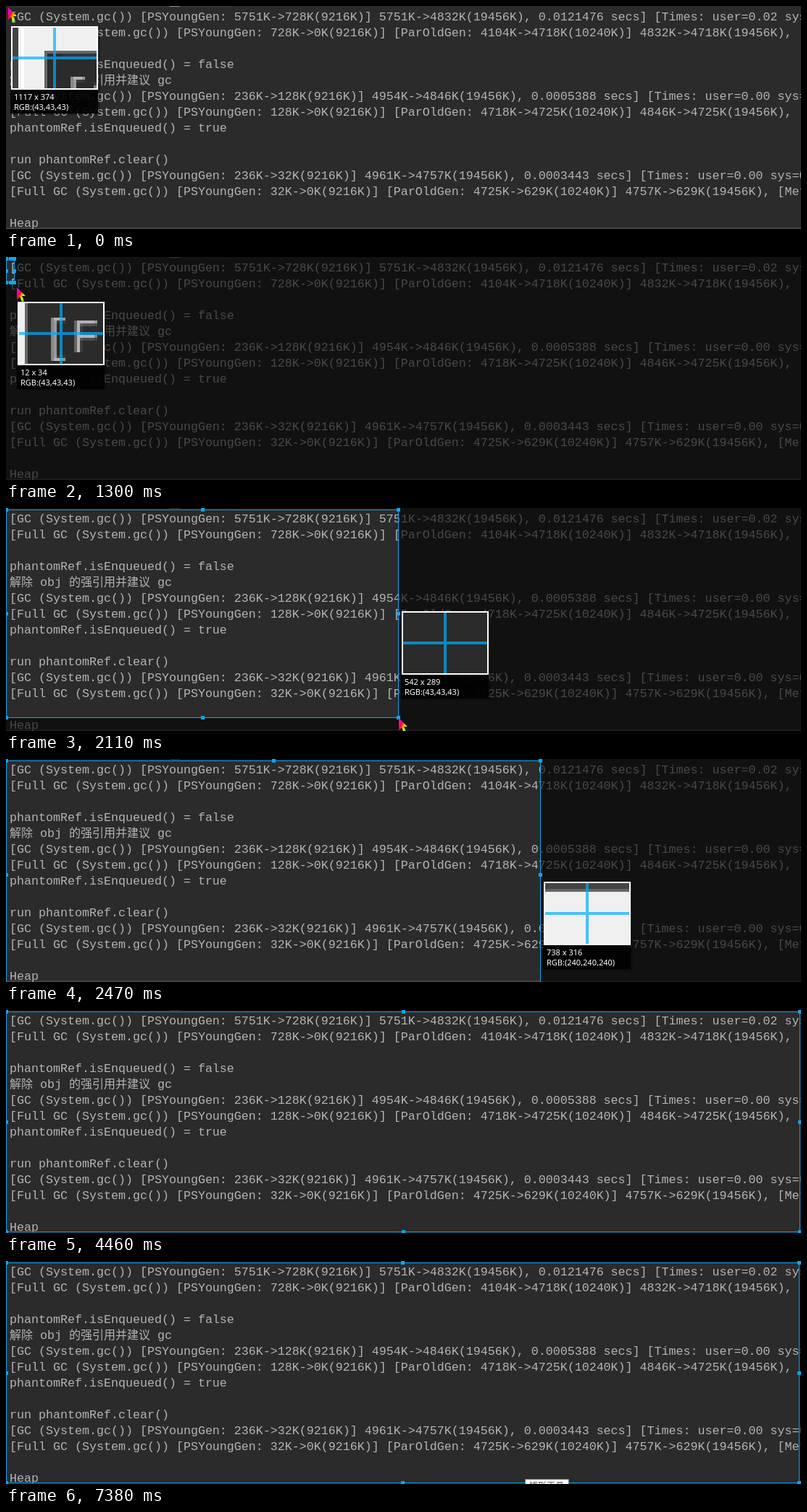
Write an HTML page with a canvas that moves like this. It is 1097x309 px and loops after 8 s.

```html
<!DOCTYPE html>
<html lang="zh">
<head>
<meta charset="utf-8">
<title>Screen region selection</title>
<style>
html, body { margin: 0; width: 100%; height: 100%; overflow: hidden; background: #2b2b2b; }
canvas { display: block; }
</style>
</head>
<body>
<canvas id="stage" width="1097" height="309"></canvas>
<script>
const W = 1097, H = 309, LOOP = 8000, PAD = 40, TOP = 2;
const BLUE = '#0ca5f5', CROSS = 'rgba(0, 174, 255, .7)';
const MONO = '16.667px "Liberation Mono", monospace';
const CJK = '"Noto Sans CJK SC", "Noto Sans CJK", sans-serif';

const minorGc = (young, youngLeft, total, left, secs, user) =>
  `[GC (System.gc()) [PSYoungGen: ${young}K->${youngLeft}K(9216K)] ` +
  `${total}K->${left}K(19456K), ${secs} secs] [Times: user=${user} sys=0.00`;
const fullGc = (young, old, left, total) =>
  `[Full GC (System.gc()) [PSYoungGen: ${young}K->0K(9216K)] ` +
  `[ParOldGen: ${old}K->${left}K(10240K)] ${total}K->${left}K(19456K), [Metaspace`;

const LINES = [
  minorGc(5751, 728, 5751, 4832, '0.0121476', '0.02'),
  fullGc(728, 4104, 4718, 4832),
  '',
  'phantomRef.isEnqueued() = false',
  '解除 obj 的强引用并建议 gc',
  minorGc(236, 128, 4954, 4846, '0.0005388', '0.00'),
  fullGc(128, 4718, 4725, 4846),
  'phantomRef.isEnqueued() = true',
  '',
  'run phantomRef.clear()',
  minorGc(236, 32, 4961, 4757, '0.0003443', '0.00'),
  fullGc(32, 4725, 629, 4757),
  '',
  'Heap'
];

// The drag advances in steps of 130 ms between these points: [step, x, y]
const DRAG = [[0, 12, 36], [3, 444, 260], [5, 476, 282], [9, 738, 318], [15, 1081, 316], [21, 1094, 308]];
const STEP = 130, DRAG_AT = 1300, RELEASE_AT = 4460, SETTLE_AT = 5470;

const ctx = document.getElementById('stage').getContext('2d');
const screen = drawScreen();

function box(c, color, x, y, w, h) {
  c.fillStyle = color;
  c.fillRect(x, y, w, h);
}

function write(c, text, x, y, font, color) {
  c.font = font;
  c.fillStyle = color;
  c.fillText(text, x, y);
}

function polygon(points, fill, stroke) {
  ctx.beginPath();
  points.forEach(([x, y]) => ctx.lineTo(x, y));
  ctx.closePath();
  if (stroke) {
    ctx.strokeStyle = stroke;
    ctx.stroke();
  }
  ctx.fillStyle = fill;
  ctx.fill();
}

// The console and a margin around it, which the magnifier can reach
function drawScreen() {
  const canvas = document.createElement('canvas');
  canvas.width = W + 2 * PAD;
  canvas.height = H + 2 * PAD;
  const c = canvas.getContext('2d');
  c.translate(PAD, PAD);
  box(c, '#f0f0f0', -PAD, -PAD, W + 2 * PAD, H + 2 * PAD);
  box(c, '#444444', -PAD, -PAD, PAD - 10, H + 2 * PAD);
  box(c, '#ffffff', -9, -PAD, 1, H + 2 * PAD);
  box(c, '#666666', -1, -1, W + 2, H + 2);
  box(c, '#2b2b2b', 0, 0, W, H);
  box(c, '#333537', 5, 0, 306, 2);
  box(c, '#8a8c8d', 226, 0, 14, 1);
  box(c, '#444444', 0, H - 2, W, 2);

  LINES.forEach((line, row) => {
    let x = 5;
    for (const part of line.match(/[\u4e00-\u9fff]+|[^\u4e00-\u9fff]+/g) || []) {
      const font = part > '\u4e00' ? '16px ' + CJK : MONO;
      write(c, part, x, 20 + 22 * row, font, '#b4b4b4');
      x += c.measureText(part).width;
    }
  });
  return canvas;
}

function pointerAt(t) {
  if (t < 460) return [3, 2];
  if (t < DRAG_AT) return [5, 4];
  if (t >= RELEASE_AT) return [t < SETTLE_AT ? 1096 : 1095, 308];
  const step = Math.floor((t - DRAG_AT) / STEP);
  const next = DRAG.findIndex(key => key[0] > step);
  if (next < 0) return DRAG[DRAG.length - 1].slice(1);
  const from = DRAG[next - 1], to = DRAG[next];
  const p = (step - from[0]) / (to[0] - from[0]);
  return [1, 2].map(i => Math.round(from[i] + (to[i] - from[i]) * p));
}

function drawSelection(w, bottom) {
  const h = bottom - TOP;
  ctx.fillStyle = 'rgba(0, 0, 0, .6)';
  ctx.beginPath();
  ctx.rect(0, 0, W, H);
  ctx.rect(0, TOP, w, h);
  ctx.fill('evenodd');

  ctx.strokeStyle = BLUE;
  ctx.lineWidth = 1;
  ctx.strokeRect(.5, TOP + .5, w - 1, h - 1);
  const xs = [0, w >> 1, w - 1], ys = [TOP, TOP + (h >> 1), bottom - 1];
  xs.forEach((x, i) => ys.forEach((y, j) => {
    if (i !== 1 || j !== 1) box(ctx, BLUE, x - 2, y - 2, 5, 5);
  }));
}

function drawMagnifier(px, py, size) {
  const x = px + 3, y = py + 174 > 376 ? py - 148 : py + 26;
  box(ctx, 'rgba(0, 0, 0, .25)', x + 2, y + 3, 122, 120);
  box(ctx, 'rgba(0, 0, 0, .88)', x, y + 88, 121, 33);
  box(ctx, '#ffffff', x + 1, y, 120, 88);

  // Zoom of 4, centred on the last pixel inside the selection
  ctx.save();
  ctx.beginPath();
  ctx.rect(x + 3, y + 2, 116, 84);
  ctx.clip();
  ctx.imageSmoothingEnabled = false;
  ctx.drawImage(screen, px - 16 + PAD, py - 12 + PAD, 31, 23, x - 1, y - 2, 124, 92);
  box(ctx, CROSS, x + 59, y, 4, 88);
  box(ctx, CROSS, x, y + 42, 59, 4);
  box(ctx, CROSS, x + 63, y + 42, 60, 4);
  ctx.restore();

  const font = '11px "Noto Sans", sans-serif';
  const level = py > H + 1 ? 240 : 43;
  write(ctx, size, x + 5, y + 102, font, '#ffffff');
  write(ctx, `RGB:(${level},${level},${level})`, x + 5, y + 116, font, '#ffffff');
}

function drawArrow(x, y) {
  ctx.save();
  ctx.translate(x, y);
  const hue = ctx.createLinearGradient(0, 9, 11, 15);
  ['#ff00d0', '#ff0040', '#ff9000', '#ffff00', '#40ff20']
    .forEach((color, i) => hue.addColorStop(i / 4, color));
  polygon([[0, 0], [0, 17], [4, 13], [7, 20], [10, 19], [7, 12], [12, 12]], hue);
  ctx.restore();
}

function drawMoveCursor(x, y) {
  ctx.save();
  ctx.translate(x + 11.5, y + 11.5);
  const arm = [[-1, -1], [-1, -6], [-4, -6], [0, -10.5], [4, -6], [1, -6]];
  const points = [];
  for (let turn = 0; turn < 4; turn++) {
    const c = Math.cos(turn * Math.PI / 2), s = Math.sin(turn * Math.PI / 2);
    arm.forEach(([u, v]) => points.push([u * c - v * s, u * s + v * c]));
  }
  ctx.lineWidth = 2;
  polygon(points, '#ffffff', '#000000');
  ctx.restore();
}

function drawTooltip(opacity) {
  ctx.save();
  ctx.globalAlpha = opacity;
  box(ctx, '#767676', 716, 302, 61, 20);
  box(ctx, '#ffffff', 717, 303, 59, 18);
  write(ctx, '矩形工具', 722, 316, '12px ' + CJK, '#575757');
  ctx.restore();
}

function render(t) {
  const [x, y] = pointerAt(t);
  const selecting = t >= DRAG_AT;
  ctx.drawImage(screen, -PAD, -PAD);
  if (selecting) drawSelection(x, y);
  if (t < RELEASE_AT) {
    drawMagnifier(x, y, selecting ? `${x} x ${y - TOP}` : '1117 x 374');
    const lead = selecting && t < DRAG_AT + STEP ? 3 : 0;
    drawArrow(x + lead, y + 2 * lead);
  }
  if (t >= 5750 && t < 5900) drawMoveCursor(760, 285);
  if (t >= 5900 && t < 6020) drawMoveCursor(413, 257);
  if (t >= 7260) drawTooltip(t < 7380 ? .5 : 1);
}

const start = performance.now();
function tick() {
  render((performance.now() - start) % LOOP);
  requestAnimationFrame(tick);
}
tick();
</script>
</body>
</html>
```
